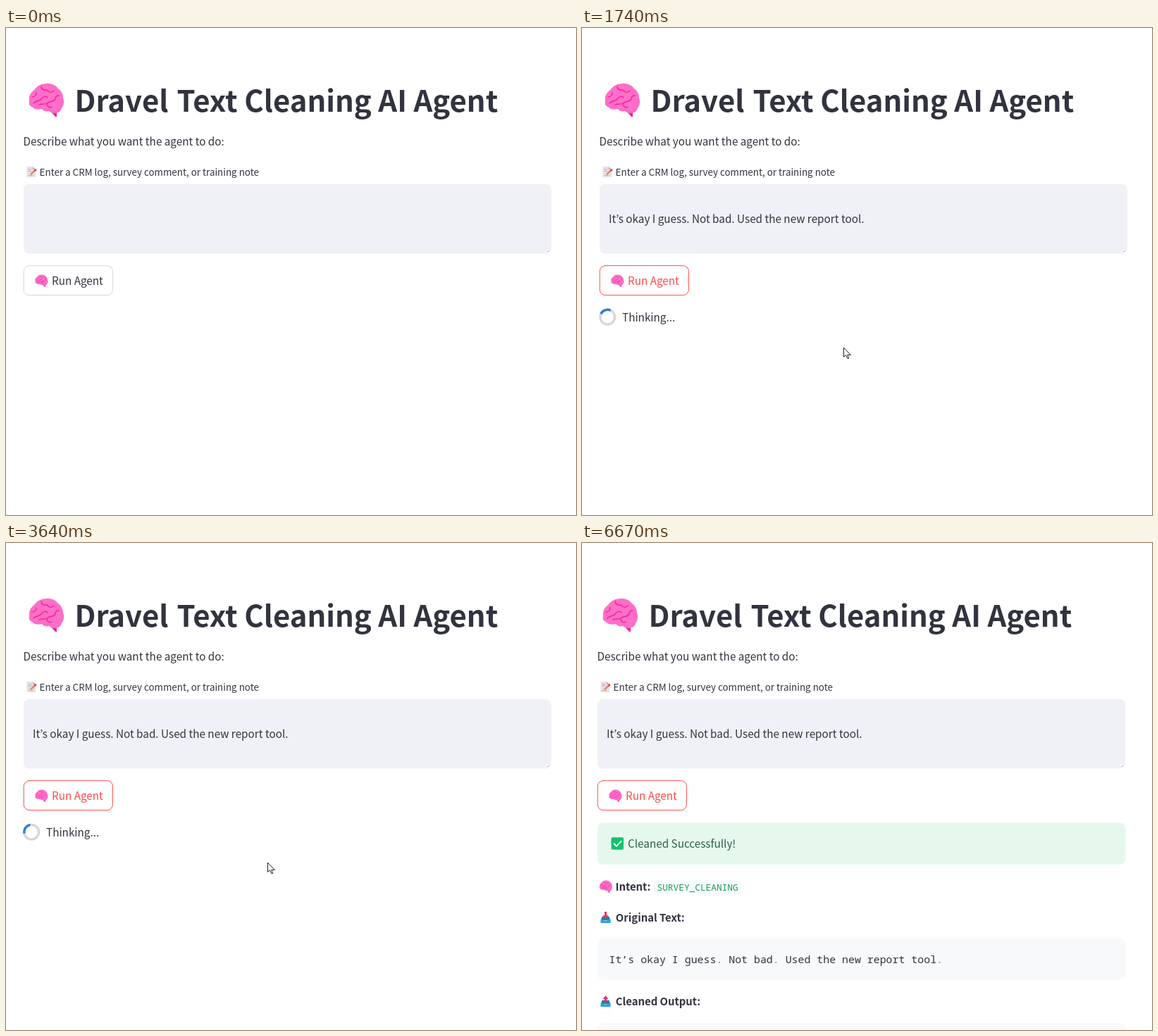
An HTML page with a canvas that plays this animation: 809 px wide and 692 px high, repeating every 8000 ms.

```html
<!DOCTYPE html>
<html lang="en">
<head>
<meta charset="utf-8">
<title>Text Cleaning AI Agent</title>
<style>
  html, body { margin: 0; width: 100%; height: 100%; overflow: hidden; background: #fff; }
  canvas { display: block; }
</style>
</head>
<body>
<canvas id="stage" width="809" height="692"></canvas>
<script>
const ctx = document.getElementById('stage').getContext('2d');
const LOOP = 8000;
const SANS = '"Noto Sans CJK JP", "Noto Sans CJK SC", "Noto Sans CJK", "Open Sans", sans-serif';
const MONO = '"Noto Sans Mono", "DejaVu Sans Mono", monospace';
const INK = '#31333f', RED = '#fb4a4b', PANEL = '#f0f1f6', CODE = '#f8f9fb';
const BODY = 15.27, STRONG = 14.88, LABEL = 13.38, TITLE = 41.88;
const NOTE = 'It’s okay I guess. Not bad. Used the new report tool.';

// Moments when the page changes
const T = { filled: 70, pressed: 200, thinking: 440, success: 3770, results: 3850, leave: 6240 };
const MOVE_STEP = 71.6;

function text(str, x, y, size = BODY, color = INK, weight = 400, family = SANS) {
  ctx.font = `${weight} ${size}px ${family}`;
  ctx.fillStyle = color;
  ctx.fillText(str, x, y);
}

function box(x, y, w, h, r, fill, stroke) {
  ctx.beginPath();
  ctx.roundRect(x, y, w, h, r);
  if (fill) { ctx.fillStyle = fill; ctx.fill(); }
  if (stroke) { ctx.strokeStyle = stroke; ctx.lineWidth = 1; ctx.stroke(); }
}

function at(x, y, scale, draw) {
  ctx.save();
  ctx.translate(x, y);
  ctx.scale(scale, scale);
  draw();
  ctx.restore();
}

function fill(d, color) {
  ctx.fillStyle = color;
  ctx.fill(new Path2D(d));
}

function line(d, color, width) {
  ctx.strokeStyle = color;
  ctx.lineWidth = width;
  ctx.lineCap = ctx.lineJoin = 'round';
  ctx.stroke(new Path2D(d));
}

function brain(x, y, scale) {
  at(x, y, scale, () => {
    fill('M29 37 L40 38 V47 H38 Z', '#f51f8c');
    fill('M1 24C0 17 4 12 8 9C12 3 19 0 25 0C31-1 39 2 42 7C46 9 49 15 49 20C51 25 50 32 47 35' +
         'C46 40 41 42 37 42C34 42 31 41 29 39C25 40 21 39 19 36C13 38 7 36 5 33C1 32 0 28 1 24Z', '#ff6ec7');
    line('M5 19C9 19 11 16 11 13M18 4C18 8 22 10 26 9M26 9C29 13 33 13 36 10' +
         'M7 28C11 24 16 25 18 22C20 18 25 17 27 20M15 30C19 28 23 30 26 28C30 24 35 27 38 22' +
         'M38 22C38 19 40 17 43 17M26 28C26 33 30 35 33 33', '#f0269a', 1.5);
  });
}

function memo(x, y) {
  at(x, y, 1, () => {
    fill('M0.5 0H9L13 4V15H0.5Z', '#e4e1e5');
    fill('M9 0V4H13Z', '#b9b5bd');
    line('M3 4H7M3 6.5H6M3 12.5H9', '#a9a4af', 0.8);
    line('M12.5 5L6.4 10.6', '#f28354', 2.6);
    line('M13 4.6L12.2 5.3', '#e8456a', 2.8);
    fill('M3.4 13L4.8 9.4L7.3 11.8Z', '#f3c49a');
  });
}

function tray(x, y, up) {
  at(x, y, 1, () => {
    fill('M3 6H13L15 13V16H1V13Z', '#b9c6d3');
    fill('M3 7H13L14.5 12H1.5Z', '#1b7fb8');
    fill('M1 11H5L6 13H10L11 11H15V15Q15 16 14 16H2Q1 16 1 15Z', '#26a3e0');
    fill(up ? 'M8 0L12 5H9.5V9.5H6.5V5H4Z' : 'M6.5 0H9.5V5H12L8 10L4 5H6.5Z', '#f0315d');
  });
}

function checkMark(x, y) {
  box(x, y, 17.5, 17.5, 2, '#10c46c');
  line(`M${x + 4} ${y + 9}l3.4 3.6l6.6-7`, '#fff', 2);
}

function spinner(t) {
  const mid = Math.PI / 4 + (t - 1170) / 1000 * Math.PI * 2;
  const arc = (from, to, color) => {
    ctx.beginPath();
    ctx.arc(36.2, 410.7, 10.4, from, to);
    ctx.strokeStyle = color;
    ctx.stroke();
  };
  ctx.lineCap = 'butt';
  ctx.lineWidth = 3.3;
  arc(0, Math.PI * 2, '#d6d6d9');
  arc(mid - Math.PI / 4, mid + Math.PI / 4, '#2980d2');
}

function cursor(x, y) {
  at(x + 0.5, y + 0.5, 1, () => {
    const arrow = 'M0 0V13L3 10.2L5.2 15H7.2L5.3 10H9.4Z';
    fill(arrow, '#fff');
    line(arrow, '#20222c', 1);
  });
}

function form(t) {
  brain(32, 79, 1);
  text('Dravel', 97.5, 119, TITLE, INK, 700);
  text('Text Cleaning AI Agent', 242.5, 119, TITLE, INK, 700);
  text('Describe what you want the agent to do:', 24.5, 167);
  memo(29, 197);
  text('Enter a CRM log, survey comment, or training note', 47.6, 210, LABEL);

  box(25, 222, 749, 98.5, 8, PANEL);
  box(767.5, 314.5, 4.5, 4.5, 0, '#fff');
  line('M769 318L771 316.2', '#6b6d76', 0.8);
  if (t >= T.filled) text(NOTE, 38.1, 277);

  const pressed = t >= T.pressed;
  box(25.2, 337.7, 126.2, 42, 8, '#fff', pressed ? RED : '#d6d6d9');
  brain(41, 350.5, 0.37);
  text('Run Agent', 65, 365, BODY, pressed ? RED : INK);
}

function results() {
  brain(24.5, 479.5, 0.37);
  text('Intent:', 47.5, 494, STRONG, INK, 600);
  box(102, 479, 124, 20, 4, CODE);
  text('SURVEY_CLEANING', 106.5, 493.5, 12.8, '#1a9d60', 400, MONO);

  tray(25.5, 524, false);
  text('Original Text:', 47.8, 538, STRONG, INK, 600);
  box(22, 562, 749.5, 58.5, 8, CODE);
  text(NOTE.replace(/\./g, ' '), 38.5, 597, 14.9, INK, 400, MONO);
  text(NOTE.replace(/[^.]/g, ' '), 38.5, 597, 14.9, '#7d808a', 400, MONO);

  tray(25.5, 643, true);
  text('Cleaned Output:', 47.8, 657, STRONG, INK, 600);
  box(22, 682, 749.5, 40, 8, CODE);
}

function pointer(t) {
  if (t < T.thinking) return;
  if (t < T.leave) return cursor(371, 454);
  const step = Math.floor((t - T.leave) / MOVE_STEP);
  if (step < 6) cursor(436 + 67 * step, 468 + 224 * (step / 5) ** 1.2);
}

function draw(t) {
  ctx.fillStyle = '#fff';
  ctx.fillRect(0, 0, 809, 692);

  // The page shifts left once its scrollbar appears
  at(t >= T.results ? -3 : 0, 0, 1, () => form(t));

  if (t >= T.thinking && t < T.success) {
    spinner(t);
    text('Thinking...', 57, 417);
  }
  if (t >= T.success) {
    box(22, 397.5, 749.5, 59.5, 8, '#e6f8ed');
    checkMark(41.5, 418.3);
    text('Cleaned Successfully!', 65, 433, BODY, '#2a604b');
  }
  if (t >= T.results) results();
  pointer(t);
}

const start = performance.now();
function tick() {
  draw((performance.now() - start) % LOOP);
  requestAnimationFrame(tick);
}
tick();
</script>
</body>
</html>
```
